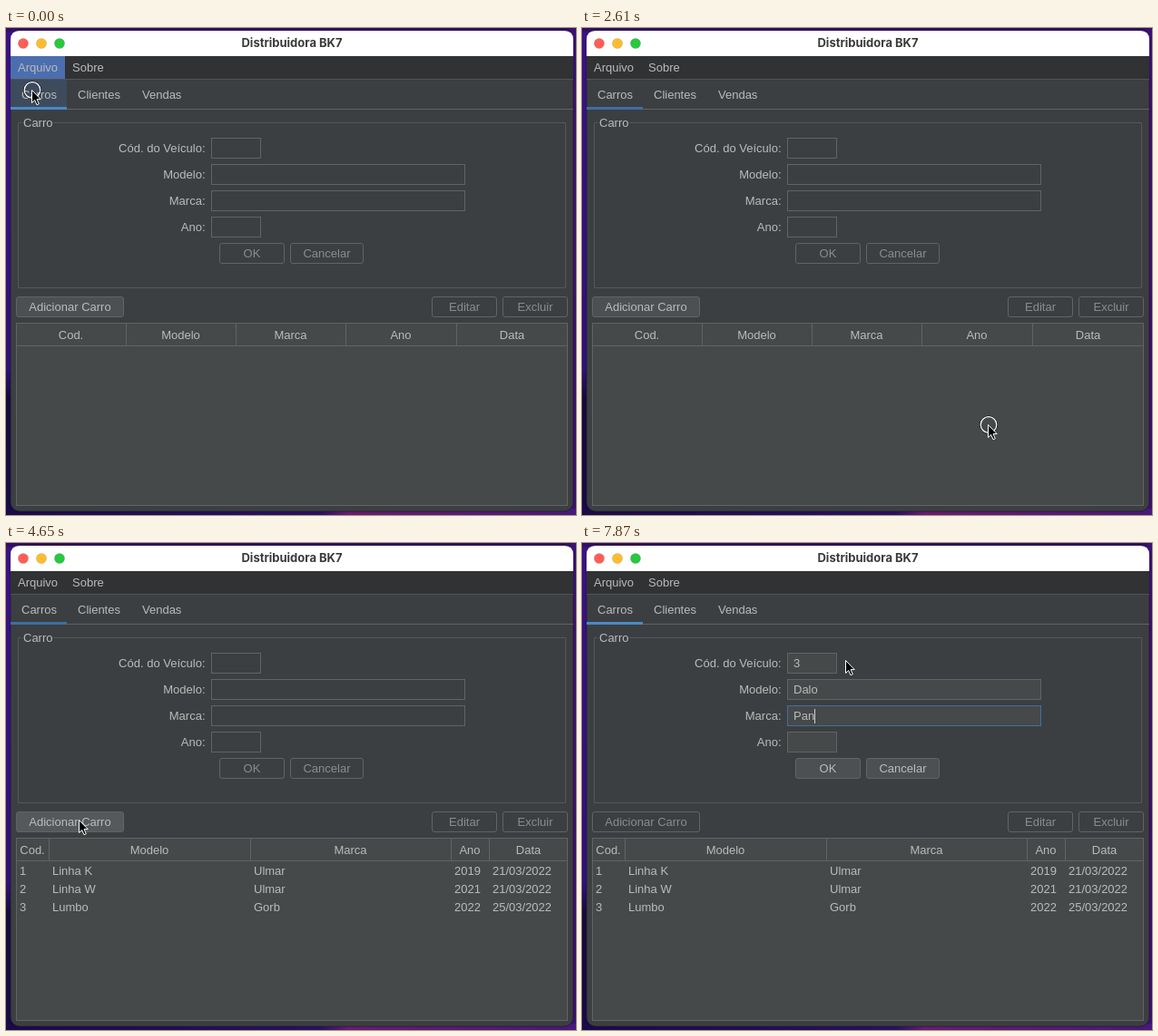
An HTML page for the animation above (7990 ms loop, 628 by 537 pixels).

```html
<!DOCTYPE html>
<html lang="pt">
<head>
<meta charset="utf-8">
<style>
html, body { margin: 0; width: 100%; height: 100%; overflow: hidden; background: #1b0b4a; }
svg { display: block; width: 628px; height: 537px; font: 13px "Liberation Sans", Arial, sans-serif; }
text { white-space: pre; }
.title { font: 700 13px Inter, sans-serif; }
.shadow { filter: drop-shadow(0 14px 18px rgba(0,0,0,.5)); }
</style>
</head>
<body>
<svg id="stage" viewBox="0 0 628 537"></svg>
<script>
const LOOP = 7990;
const PANEL = '#3c3f41', FIELD = '#45494a', LINE = '#616365', TEXT = '#bbbbbb', DIM = '#8a8c8d';
const ACCENT = '#466d9e', SELECT = '#4b6eaf';
const stage = document.getElementById('stage');
const pen = document.createElement('canvas').getContext('2d');
pen.font = '13px "Liberation Sans", Arial, sans-serif';

// Each step changes part of the state at its time (ms).
const steps = [
  [0, { mouse: [28, 68], ring: 1, menu: 1, tab: 'lit', dialog: '', code: '', model: '', brand: '' }],
  [110, { ring: 0, menu: 0, tab: '', dialog: 'file', folder: 'bia', target: 'file', caret: 1 }],
  [590, { mouse: [84, 158], caret: 0 }],
  [710, { mouse: [128, 229] }],
  [1180, { ring: 1 }],
  [1300, { ring: 0, folder: 'Downloads', target: 'list' }],
  [1780, { mouse: [128, 207] }],
  [1900, { mouse: [128, 185] }],
  [2020, { ring: 1, picked: 1 }],
  [2370, { mouse: [240, 290], ring: 0 }],
  [2490, { mouse: [410, 415] }],
  [2610, { mouse: [447, 437], ring: 1, dialog: '', target: '' }],
  [2730, { ring: 0, dialog: 'message' }],
  [3210, { mouse: [440, 370] }],
  [3330, { mouse: [427, 310] }],
  [3810, { ring: 1, dialog: '', rows: 1 }],
  [3930, { ring: 0 }],
  [4410, { mouse: [330, 309] }],
  [4530, { mouse: [170, 307] }],
  [4650, { mouse: [80, 305], hover: 1 }],
  [5010, { ring: 1, hover: 0, editing: 1, tab: 'lit' }],
  [5130, { ring: 0, tab: 'bright', target: 'table' }],
  [5610, { mouse: [170, 221] }],
  [5730, { mouse: [218, 150] }],
  [5850, { mouse: [236, 125], ring: 1 }],
  [5960, { ring: 0, target: 'code', caret: 1 }],
  [6320, { code: '3' }],
  [6680, { mouse: [262, 119] }],
  [6800, { mouse: [290, 129] }],
  [7160, { target: 'model' }],
  [7280, { model: 'D' }],
  [7400, { model: 'Da' }],
  [7520, { model: 'Dalo' }],
  [7760, { target: 'brand' }],
  [7870, { brand: 'Pan' }]
];

const fill = (x, y, w, h, color, r = 0) =>
  `<rect x="${x}" y="${y}" width="${w}" height="${h}" rx="${r}" fill="${color}"/>`;
const box = (x, y, w, h, color, line = LINE, r = 0) =>
  `<rect x="${x + .5}" y="${y + .5}" width="${w - 1}" height="${h - 1}" rx="${r}" fill="${color}" stroke="${line}"/>`;
const text = (x, y, str, color = TEXT, anchor = 'start', more = '') =>
  `<text x="${x}" y="${y}" fill="${color}" text-anchor="${anchor}" ${more}>${str}</text>`;
const stroke = (d, color = '#afb1b3') => `<path d="${d}" fill="none" stroke="${color}"/>`;

const button = (x, y, w, label, on, hover) =>
  box(x, y, w, 23, on ? (hover ? '#55595c' : '#4c5052') : PANEL, LINE, 2.5) +
  text(x + w / 2, y + 16, label, on ? TEXT : DIM, 'middle');

function field(x, y, w, value, on, active, caret) {
  const end = Math.round(x + 7 + pen.measureText(value).width) + .5;
  return box(x, y, w, 23, on ? FIELD : PANEL, active ? ACCENT : LINE) +
    text(x + 7, y + 16, value) +
    (active && caret ? stroke(`M${end} ${y + 4}v16`, '#d0d0d0') : '');
}

const folder = (x, y) => stroke(`M${x + .5} ${y + .5}h4.5l2 2h6.5v8.5h-13z`);
const chevron = (x, y) => stroke(`M${x - 4.5} ${y - 2}l4.5 4.5l4.5-4.5`);

function frame(x, y, w, h, title, active, lights) {
  const colors = ['#ff5f57', '#febc2e', '#28c840'];
  const top = `M${x} ${y + 28}v-18q0-10 10-10h${w - 20}q10 0 10 10v18z`;
  return `<rect x="${x}" y="${y}" width="${w}" height="${h}" rx="10" fill="${PANEL}" stroke="#17181b" stroke-opacity=".6"/>` +
    `<path d="${top}" fill="${active ? '#fff' : '#ececec'}"/>` +
    colors.map((c, i) => {
      const on = active && lights[i];
      return `<circle cx="${x + 14 + 20 * i}" cy="${y + 14}" r="5.6" fill="${on ? c : '#d9d9d9'}" stroke="${on ? '#0002' : '#bcbcbc'}" stroke-width=".8"/>`;
    }).join('') +
    text(x + w / 2, y + 18.3, title, active ? '#3a3a3a' : '#afafaf', 'middle', 'class="title"');
}

const backdrop = () => `<defs>
  <linearGradient id="side" x2="0" y2="1"><stop offset="0" stop-color="#3b1184"/><stop offset=".7" stop-color="#30107a"/><stop offset=".76" stop-color="#140a3c"/><stop offset="1" stop-color="#180a48"/></linearGradient>
  <linearGradient id="edge"><stop offset="0" stop-color="#1a0a4a"/><stop offset=".55" stop-color="#2a0f66"/><stop offset=".6" stop-color="#6a1a70"/><stop offset="1" stop-color="#48187c"/></linearGradient>
  </defs>` + fill(0, 0, 628, 537, 'url(#side)') + fill(0, 0, 628, 4, '#32105f') +
  fill(622, 0, 6, 537, '#3a1272') + fill(0, 530, 628, 7, 'url(#edge)');

function table(s) {
  const cuts = s.rows ? [11, 47, 269, 490, 532, 619] : [11, 132, 253, 374, 496, 619];
  const rows = s.rows ? [
    ['1', 'Linha K', 'Ulmar', '2019', '21/03/2022'],
    ['2', 'Linha W', 'Ulmar', '2021', '21/03/2022'],
    ['3', 'Lumbo', 'Gorb', '2022', '25/03/2022']
  ] : [];
  return box(11, 325, 608, 202, FIELD, s.target === 'table' ? ACCENT : LINE) +
    stroke('M12 350.5H618' + cuts.slice(1, 5).map(x => `M${x + .5} 326v24`).join(''), LINE) +
    ['Cod.', 'Modelo', 'Marca', 'Ano', 'Data'].map((h, i) =>
      text((cuts[i] + cuts[i + 1]) / 2, 343, h, TEXT, 'middle')).join('') +
    rows.map((r, j) => r.map((v, i) => text(cuts[i] + 4, 366 + 20 * j, v)).join('')).join('');
}

function mainWindow(s) {
  const on = s.editing;
  const labels = ['Cód. do Veículo:', 'Modelo:', 'Marca:', 'Ano:'];
  const input = (key, i, w) => field(226, 121 + 29 * i, w, s[key] || '', on, s.target === key, s.caret);
  return frame(5, 3, 620, 530, 'Distribuidora BK7', !s.dialog, [1, 1, 1]) +
    fill(5, 31, 620, 25, '#303234') + fill(5, 56, 620, 1, '#515355') +
    (s.menu ? fill(5, 31, 60, 25, SELECT) : '') +
    text(13, 48, 'Arquivo') + text(73, 48, 'Sobre') +
    (s.tab === 'lit' ? fill(5, 57, 62, 30, '#3d4b5c') : '') +
    fill(5, 89, 620, 1, LINE) + fill(5, 87, 62, 3, s.tab ? '#4a88c7' : '#3f6ea5') +
    text(17, 78, 'Carros') + text(79, 78, 'Clientes') + text(150, 78, 'Vendas') +
    stroke('M17 104.5h-3.5v182h603v-182H52', '#55585a') + text(19, 109, 'Carro') +
    labels.map((l, i) => text(219.5, 137 + 29 * i, l, TEXT, 'end')).join('') +
    input('code', 0, 55) + input('model', 1, 280) + input('brand', 2, 280) + input('year', 3, 55) +
    button(235, 237, 72, 'OK', on) + button(313, 237, 81, 'Cancelar', on) +
    button(11, 296, 119, 'Adicionar Carro', !on, s.hover) +
    button(469, 296, 72, 'Editar') + button(547, 296, 72, 'Excluir') + table(s);
}

function toolbar() {
  let dots = '', lines = '';
  for (const y of [148.5, 154.5]) for (const x of [531.5, 537.5]) dots += `M${x} ${y}h4v4h-4z`;
  for (const y of [149.5, 153.5, 157.5]) lines += `M556 ${y}h2M560 ${y}h8`;
  return fill(525, 142, 22, 22, '#5a5e60', 3) + folder(451, 147) + folder(503, 147) +
    stroke('M458 157v-5.5m-2.5 2.5l2.5-2.5l2.5 2.5', '#3592c4') +
    stroke('M510 151v6m-3-3h6', '#499c54') +
    stroke('M478 153.5l6-6l6 6M479.5 152.5v6h3v-4h3v4h3v-6') + stroke(dots) + stroke(lines);
}

function fileDialog(s) {
  const home = ['Desktop', 'Documents', 'Downloads', 'Library', 'Movies', 'Music', 'Pictures', 'Public'];
  const list = s.folder === 'Downloads'
    ? (s.picked ? fill(87, 177, 89, 19, SELECT) : '') +
      stroke('M95.5 180.5h6l4 4v8h-10zM101.5 180.5v4h4') + text(113, 191, 'save.json')
    : home.map((n, i) => folder(94, 181 + 19 * i) + text(113, 191 + 19 * i, n)).join('');
  return '<g class="shadow">' + frame(74, 101, 512, 354, 'Procurar arquivo:', true, [1, 0, 1]) + '</g>' +
    text(86, 158, 'Look In:') + box(143, 141, 291, 24, FIELD) + folder(151, 147) +
    text(170, 158, s.folder) + chevron(423, 153) + toolbar() +
    box(86, 176, 489, 166, FIELD, s.target === 'list' ? ACCENT : LINE) + list +
    text(86, 369, 'File Name:') +
    field(176, 353, 399, s.picked ? 'save.json' : '', true, s.target === 'file', s.caret) +
    text(86, 397, 'Files of Type:') + box(176, 381, 399, 23, FIELD) +
    text(183, 397, 'Dados Salvos (*.json)') + chevron(563, 392) +
    box(426, 421, 72, 23, '#365880', '#4c708c', 2.5) +
    text(462, 437, 'Open', TEXT, 'middle', 'font-weight="700"') + button(503, 421, 72, 'Cancel', true);
}

const messageDialog = () =>
  '<g class="shadow">' + frame(166, 201, 298, 134, 'Message', true, [1, 0, 0]) + '</g>' +
  '<circle cx="194" cy="257" r="14" fill="#3592c4"/>' + fill(192.5, 255, 3, 10, PANEL) + fill(192.5, 249, 3, 3, PANEL) +
  text(222, 262, 'Dados carregados com sucesso!') +
  box(380, 300, 72, 23, '#365880', '#4c708c', 2.5) +
  text(416, 316, 'OK', TEXT, 'middle', 'font-weight="700"');

const pointer = ({ mouse: [x, y], ring }) => `<g transform="translate(${x} ${y})">` +
  (ring ? '<g fill="none"><circle cx="1" cy=".5" r="9.6" stroke="#111"/><circle cx="1" cy=".5" r="8.8" stroke="#fff" stroke-width="1.2"/></g>' : '') +
  '<path d="M.5 .5v14l3.2-3l2.3 5.2l2.3-1l-2.3-5.1h4.2z" fill="#000" stroke="#fff"/></g>';

function draw(s) {
  const dialog = s.dialog === 'file' ? fileDialog(s) : s.dialog === 'message' ? messageDialog() : '';
  stage.innerHTML = backdrop() + mainWindow(s) + dialog + pointer(s);
}

let shown = -1;
function tick() {
  const t = performance.now() % LOOP;
  const past = steps.filter(step => step[0] <= t);
  if (past.length !== shown) {
    shown = past.length;
    draw(Object.assign({}, ...past.map(step => step[1])));
  }
  requestAnimationFrame(tick);
}
tick();
</script>
</body>
</html>
```
